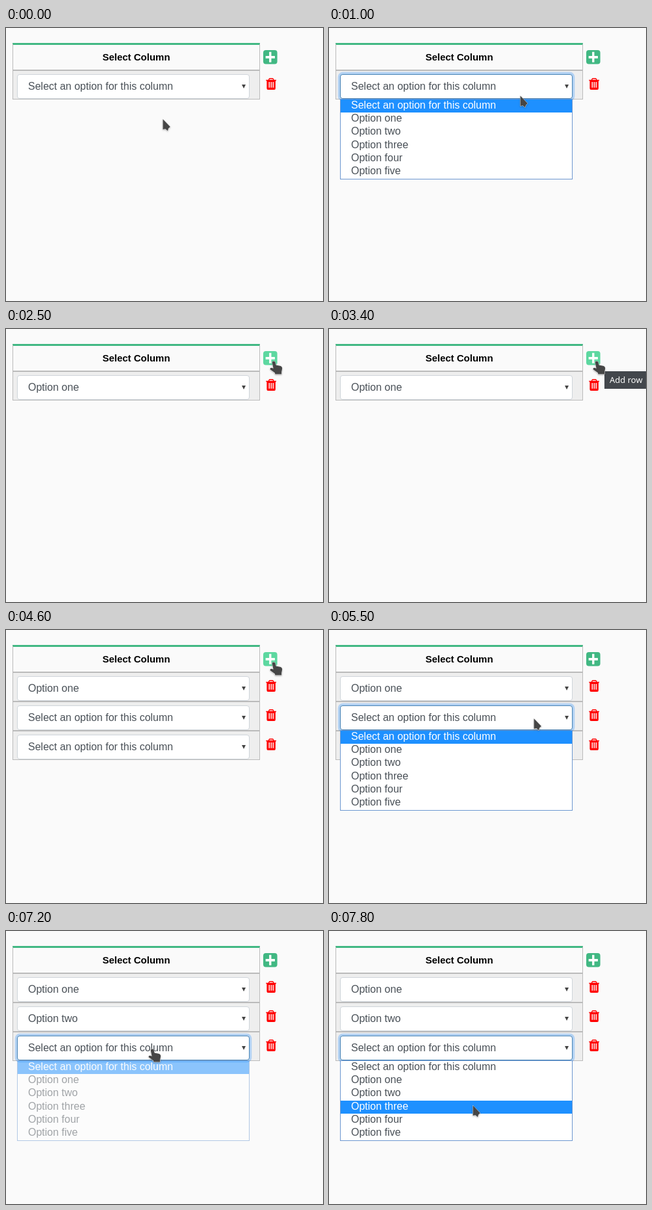
An HTML page for the animation above (8000 ms loop, 488 px wide and 420 px high).

```html
<!DOCTYPE html>
<html lang="en">
<head>
<meta charset="utf-8">
<title>Select column table</title>
<style>
  html, body { margin: 0; width: 100%; height: 100%; overflow: hidden; background: #fafafa; }
  body { font: 16px/17px "Liberation Sans", Arial, sans-serif; color: #495057; }
  div, .icon { position: absolute; box-sizing: border-box; white-space: nowrap; }
  .icon { overflow: visible; width: 22px; height: 22px; }
  .header, .row { left: 10px; width: 381px; border: 1px solid #bbb; }
  .header { top: 23px; height: 42px; border-top: 3px solid #41b883; padding-top: 10px;
    font-size: 15px; font-weight: bold; color: #000; text-align: center; }
  .row { height: 45px; background: #eee; }
  .select { left: 6px; top: 5px; width: 358px; height: 38px; padding: 6px 16px; line-height: 24px;
    background: #fff; border: 1px solid #ced4da; border-radius: 4px; }
  .focus { border-color: #80bdff; box-shadow: 0 0 0 3.2px rgba(0, 123, 255, .25); }
  .hover { border-color: #4682b4; }
  .popup { left: 17px; width: 358px; height: 124px; background: #fff; border: 1px solid #6c97d0; }
  .popup div { left: 16px; }
  .popup .bar { left: 0; width: 356px; height: 20px; background: #1e90ff; }
  .popup .active { color: #fff; }
  .tip { left: 424px; top: 65px; width: 64px; height: 27px; padding: 4px 8px; background: #31363b;
    color: #fcfcfc; font: 13px/18px "Noto Sans", "Open Sans", sans-serif; }
  .cursor { fill: #464646; stroke: #fff; stroke-opacity: .85; stroke-linejoin: round; paint-order: stroke;
    filter: drop-shadow(0 1px 1px rgba(0, 0, 0, .28)); }
</style>
</head>
<body>
<svg width="0" height="0" style="position:absolute">
  <defs>
    <path id="arrow" d="M.5 .3V16L4.4 15.3L8 18.2L9 14.5L11.9 12Z"/>
    <path id="hand" d="M4.8 .8C6.6 0 8.2 .8 8.6 2.4L9.6 6.4L16 7.8Q19.2 8.6 19.2 11.8L18.2 17V20.5H8.4L7.8 18.2L1.4 13.8Q-.2 12.4 1.2 11Q2.8 10.2 5.6 11.8L3.8 3Q3.6 1.4 4.8 .8Z"/>
    <g id="trash" fill="#f00">
      <path d="M.3 2.8H16V4.3H.3ZM1.4 4.3H14.9V15.8Q14.9 18 13 18H3.3Q1.4 18 1.4 15.8Z
        M4.5 6V14.8H6V6ZM7.5 6V14.8H9V6ZM10.5 6V14.8H12V6Z" fill-rule="evenodd"/>
      <path d="M4.3 3.2L5.3 1.2Q5.6 .7 6.2 .7H10.2Q10.8 .7 11.1 1.2L12.1 3.2" fill="none" stroke="#f00" stroke-width="1.4"/>
    </g>
    <g id="plus">
      <rect width="21.6" height="21.6" rx="4"/>
      <path d="M4.6 10.8H17M10.8 4.6V17" stroke="#fff" stroke-width="3.8" stroke-linecap="square" transform="translate(10.8 10.8) scale(.88 .98) translate(-10.8 -10.8)"/>
    </g>
  </defs>
</svg>
<div class="header">Select Column</div>
<div id="scene"></div>
<script>
const LOOP = 8000, STEP = 100, FADE = 200;
const FIRST_ROW = 65, ROW = 45, LINE = 61 / 3;
const OPTIONS = ["Select an option for this column",
  ...["one", "two", "three", "four", "five"].map(n => `Option ${n}`)];

const ROWS = [
  { added: 0, focus: 700, choose: 1700, blur: 2100 },
  { added: 3500, focus: 5300, choose: 6400, blur: 7100 },
  { added: 4600, focus: 7100, choose: LOOP, blur: LOOP }
];

// Each pointer move eases to a point and rests there until the next one starts.
const START = { x: 241, y: 140 };
const MOVES = [
  { from: 200, to: 500, x: 291, y: 92 },
  { from: 800, to: 1400, x: 303, y: 138 },
  { from: 1500, to: 1700, x: 303, y: 149 },
  { from: 1800, to: 2400, x: 421, y: 66 },
  { from: 2400, to: 2500, x: 412, y: 50 },
  { from: 4800, to: 5500, x: 315, y: 136 },
  { from: 5500, to: 5800, x: 277, y: 190 },
  { from: 5900, to: 6100, x: 274, y: 198 },
  { from: 6400, to: 6500, x: 274, y: 166 },
  { from: 6500, to: 6900, x: 225, y: 182 },
  { from: 7300, to: 7800, x: 221, y: 268 }
];

const scene = document.getElementById("scene");
const clamp = v => Math.min(1, Math.max(0, v));
const smooth = p => p * p * (3 - 2 * p);
const within = (p, x, y, w, h) => p.x >= x && p.x < x + w && p.y >= y && p.y < y + h;
const icon = (id, x, y, attrs = "") =>
  `<svg class="icon" style="left:${x}px;top:${y}px" ${attrs}><use href="#${id}"/></svg>`;

const pointerAt = t => MOVES.reduce((p, m) => {
  const k = smooth(clamp((t - m.from) / (m.to - m.from)));
  return { x: p.x + (m.x - p.x) * k, y: p.y + (m.y - p.y) * k };
}, START);

const popupAlpha = (row, t) =>
  clamp((t - row.focus) / FADE) * clamp((row.choose + .72 * FADE - t) / FADE);
const tipAlpha = t => clamp((t - 3000) / FADE) * clamp((3700 - t) / 330);

function drawRow(row, i, t, hover) {
  const top = FIRST_ROW + i * ROW;
  const state = (t >= row.focus && t < row.blur ? " focus" : "") + (hover ? " hover" : "");
  const value = OPTIONS[t >= row.choose ? i + 1 : 0];
  return `<div class="row" style="top:${top}px"><div class="select${state}">${value}</div></div>
    <svg class="icon" style="left:363px;top:${top + 22}px"><path d="M0 0h6l-3 6z" fill="#444"/></svg>` +
    icon("trash", 400, top + 12);
}

function drawPopup(row, i, t, y) {
  const alpha = popupAlpha(row, t), top = FIRST_ROW + i * ROW + 44;
  if (!alpha) return "";
  const active = t >= row.choose ? i + 1 : Math.max(0, Math.floor((y - top - 1) / LINE));
  const options = OPTIONS.map((name, k) =>
    `<div class="${k === active ? "active" : ""}" style="top:${Math.floor(k * LINE)}px">${name}</div>`);
  return `<div class="popup" style="top:${top}px;opacity:${alpha}">
    <div class="bar" style="top:${Math.round(active * LINE)}px"></div>${options.join("")}</div>`;
}

function render(t) {
  const p = pointerAt(t);
  const rows = ROWS.filter(r => t >= r.added);
  const opened = rows.findIndex(r => popupAlpha(r, t) > .5);
  const hovered = opened >= 0 ? opened :
    rows.findIndex((_, i) => within(p, 17, FIRST_ROW + 6 + i * ROW, 358, 38));
  const onPlus = within(p, 396, 34, 22, 22);
  const hand = onPlus || (opened < 0 && hovered >= 0);

  scene.innerHTML = icon("plus", 396, 34.2, `fill="${onPlus ? "#5dd8a0" : "#41b883"}"`) +
    rows.map((r, i) => drawRow(r, i, t, i === hovered)).join("") +
    rows.map((r, i) => drawPopup(r, i, t, p.y)).join("") +
    `<div class="tip" style="opacity:${tipAlpha(t)}">Add row</div>
    <svg class="icon cursor" style="left:${p.x - (hand ? 6 : 0)}px;top:${p.y - (hand ? 1 : 0)}px">
      <use href="#${hand ? "hand" : "arrow"}"/></svg>`;
}

let shown = -1;
const start = performance.now();
function frame() {
  const t = Math.floor((performance.now() - start) % LOOP / STEP) * STEP;
  if (t !== shown) render(shown = t);
  requestAnimationFrame(frame);
}
frame();
</script>
</body>
</html>
```
